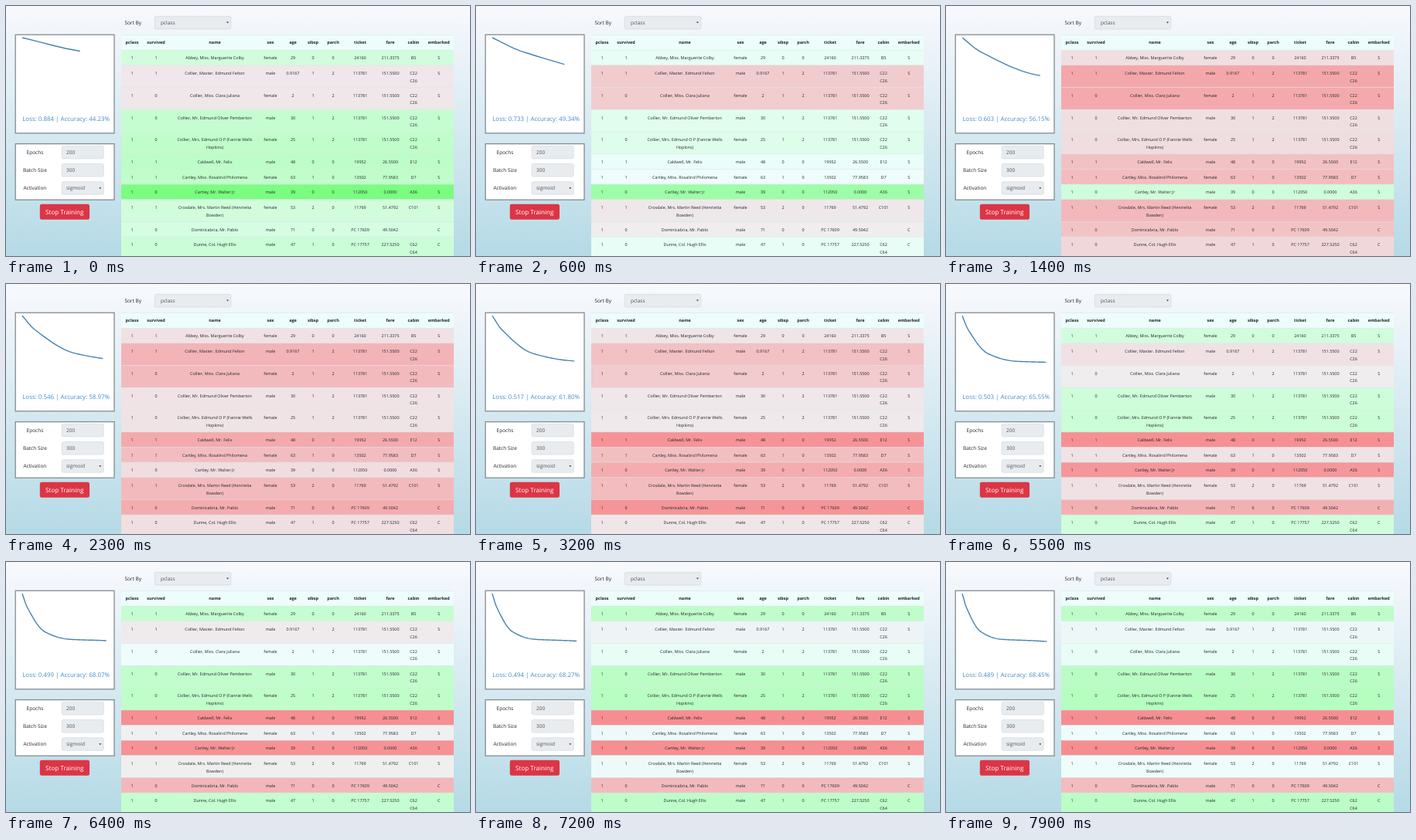
These frames come from a looping animation (600 px wide and 324 px high, 8 s). An HTML page:

```html
<!DOCTYPE html>
<html lang="en">
<head>
<meta charset="utf-8">
<title>Training dashboard</title>
<style>
html, body { margin: 0; width: 100%; height: 100%; overflow: hidden; }
svg { display: block; width: 600px; height: 324px; }
text { font-family: "Open Sans", "Noto Sans", sans-serif; text-rendering: geometricPrecision; fill: #212529; }
.cell { font-size: 5.4px; text-anchor: middle; }
.head { font-weight: 700; font-size: 5.5px; }
.label { font-size: 6.5px; text-anchor: middle; }
.value { font-size: 6.5px; fill: #495057; }
.button { font-size: 8.1px; text-anchor: middle; fill: #fff; }
.score { font-size: 7.92px; text-anchor: middle; fill: #428bca; }
.panel { fill: #fff; stroke: #858b8f; stroke-width: 1.3; }
.field { fill: #e9ecef; stroke: #ced4da; stroke-width: .6; }
.curve { fill: none; stroke: #4682b4; stroke-width: 1.4; stroke-linejoin: round; }
</style>
</head>
<body>
<svg id="stage" viewBox="0 0 600 324">
  <defs>
    <linearGradient id="sky" x1="0" y1="0" x2="0" y2="1">
      <stop offset="0" stop-color="#f8f9fd"/>
      <stop offset="1" stop-color="#b5dae6"/>
    </linearGradient>
  </defs>
  <rect width="600" height="324" fill="url(#sky)"/>
</svg>
<script>
const LOOP = 8000, STEP = 100;
const stage = document.getElementById('stage');

function add(tag, attrs, content) {
  const el = document.createElementNS('http://www.w3.org/2000/svg', tag);
  for (const key in attrs) el.setAttribute(key, attrs[key]);
  if (content !== undefined) el.textContent = content;
  return stage.appendChild(el);
}
const text = (x, y, cls, content) => add('text', { x, y, class: cls }, content);
const box = (x, y, width, height, cls, rx = 0) => add('rect', { x, y, width, height, rx, class: cls });
const arrow = (x, y) => add('path', { d: `M${x - 1.5} ${y - .6}h3l-1.5 2z`, fill: '#343a40' });

// Controls
text(164.2, 23.6, 'label', 'Sort By');
box(192.3, 13.3, 98.6, 16.6, 'field', 2);
text(200, 23.7, 'value', 'pclass');
arrow(286.5, 21.2);

box(12.2, 37.2, 127.8, 127.6, 'panel');
box(12.2, 178.6, 127.8, 72.6, 'panel');
[['Epochs', '200'], ['Batch Size', '300'], ['Activation', 'sigmoid']].forEach(([name, value], i) => {
  const y = 181.3 + i * 23.2;
  text(37.4, y + 10.7, 'label', name);
  box(72.2, y, 54, 16.6, 'field', 2);
  text(78, y + 10.7, 'value', value);
});
arrow(121.8, 235.8);

add('rect', { x: 43.8, y: 256.8, width: 64.2, height: 20, rx: 2.4, fill: '#dc3545' });
text(75.8, 269.9, 'button', 'Stop Training');

const curve = add('path', { class: 'curve' });
const score = text(77.6, 148.6, 'score', '');

// Table: each passenger has cells and a prediction quality (-1 wrong, 1 right) at four key steps
const LEFT = 149, WIDTH = 430;
const columns = [163, 194, 270, 342, 371, 397, 423, 458, 497, 527, 559.7];
const header = 'pclass survived name sex age sibsp parch ticket fare cabin embarked'.split(' ');
const people = [
  ['1;Abbey, Miss. Marguerite Colby;female;29;0;0;24160;211.3375;B5;S', [.25, -.2, -.14, .42]],
  ['1;Collier, Master. Edmund Felton;male;0.9167;1;2;113781;151.5500;C22/C26;S', [-.12, -.75, -.5, -.03]],
  ['0;Collier, Miss. Clara Juliana;female;2;1;2;113781;151.5500;C22/C26;S', [-.12, -.72, -.4, .06]],
  ['0;Collier, Mr. Edmund Oliver Pemberton;male;30;1;2;113781;151.5500;C22/C26;S', [.35, -.2, -.12, .45]],
  ['0;Collier, Mrs. Edmund O P (Fannie Wells/Hopkins);female;25;1;2;113781;151.5500;C22/C26;S', [.4, -.22, -.1, .48]],
  ['1;Caldwell, Mr. Felix;male;48;0;0;19952;26.5500;E12;S', [.42, -.5, -.95, -1]],
  ['1;Cartley, Miss. Rosalind Philomena;female;63;1;0;13502;77.9583;D7;S', [.4, -.55, -.52, 0]],
  ['0;Cartley, Mr. Walter Jr;male;39;0;0;112050;0.0000;A36;S', [1, .27, -.7, -1]],
  ['1;Crosdale, Mrs. Martin Reed (Henrietta/Bowden);female;53;2;0;11769;51.4792;C101;S', [.25, -.58, -.55, 0]],
  ['0;Dominicabria, Mr. Pablo;male;71;0;0;PC 17609;49.5042;;C', [.22, -.48, -.93, -.55]],
  ['0;Dunne, Col. Hugh Ellis;male;47;1;0;PC 17757;227.5250;C62/C64;C', [.3, -.27, -.13, .43]]
];

add('rect', { x: LEFT, y: 37.6, width: WIDTH, height: 19.6, fill: '#ecfdfb' });
add('rect', { x: LEFT, y: 37.3, width: WIDTH, height: .5, fill: '#d5e2e6' });
header.forEach((name, i) => text(columns[i], 49.1, 'cell head', name));

let rowY = 57.1;
const rows = people.map(([line, quality]) => {
  const height = line.includes('/') ? 28.8 : 19.6;
  const rect = add('rect', { x: LEFT, y: rowY, width: WIDTH, height });
  add('rect', { x: LEFT, y: rowY - .25, width: WIDTH, height: .5, fill: '#dee2e6' });
  ['1', ...line.split(';')].forEach((cell, i) =>
    cell.split('/').forEach((part, k) => text(columns[i], rowY + 12.3 + k * 9.5, 'cell', part)));
  rowY += height;
  return { rect, quality };
});

// Interpolation over sorted keys
function segment(xs, x) {
  let i = 0;
  while (i < xs.length - 2 && x > xs[i + 1]) i++;
  return [i, (x - xs[i]) / (xs[i + 1] - xs[i])];
}
function lerp(xs, ys, x) {
  const [i, u] = segment(xs, x);
  return ys[i] + (ys[i + 1] - ys[i]) * u;
}

// Row colours: linear until the turn, then easing out to the final value
const TURN = 32, LAST = 79;
const easeOut = u => Math.sin(u * Math.PI / 2);
function qualityAt(keys, step) {
  const eased = step < TURN ? step : TURN + (LAST - TURN) * easeOut((step - TURN) / (LAST - TURN));
  return lerp([0, 14, TURN, LAST], keys, eased);
}
const tones = [-1, -.1, 0, 1];
const shades = [[246, 142, 145], [239, 233, 235], [238, 253, 252], [122, 253, 128]];
const tint = v => `rgb(${[0, 1, 2].map(c => Math.round(lerp(tones, shades.map(s => s[c]), v)))})`;

// Training history at key epochs; the loss is a monotone cubic
const FIRST = 4;
const epochs = [0, 4, 18, 36, 45, 59, 68, 83];
const losses = [1.04, .884, .603, .517, .509, .503, .499, .489];
const accuracy = [40, 44.23, 56.15, 61.8, 62.34, 65.55, 68.07, 68.45];
const slopes = losses.slice(1).map((v, i) => (v - losses[i]) / (epochs[i + 1] - epochs[i]));
const tangents = losses.map((_, i) => {
  const a = slopes[Math.max(i - 1, 0)], b = slopes[Math.min(i, slopes.length - 1)];
  return 2 * a * b / (a + b);
});
function lossAt(epoch) {
  const [i, u] = segment(epochs, epoch);
  const h = epochs[i + 1] - epochs[i], w = 1 - u;
  return losses[i] * (1 + 2 * u) * w * w + losses[i + 1] * u * u * (3 - 2 * u)
    + h * u * w * (tangents[i] * w - tangents[i + 1] * u);
}

function render(step) {
  const epoch = FIRST + step;
  const points = [];
  for (let i = 0; i <= epoch; i++) {
    const x = 21 + 112 * i / (epoch + 2);
    const y = 41 + (losses[0] - lossAt(i)) * 112.5;
    points.push(`${x.toFixed(2)} ${y.toFixed(2)}`);
  }
  curve.setAttribute('d', 'M' + points.join('L'));
  score.textContent = `Loss: ${lossAt(epoch).toFixed(3)} | Accuracy: ${lerp(epochs, accuracy, epoch).toFixed(2)}%`;
  for (const { rect, quality } of rows) rect.setAttribute('fill', tint(qualityAt(quality, step)));
}

let shown = -1;
function tick() {
  const step = Math.floor(performance.now() % LOOP / STEP);
  if (step !== shown) render(shown = step);
  requestAnimationFrame(tick);
}
tick();
</script>
</body>
</html>
```
